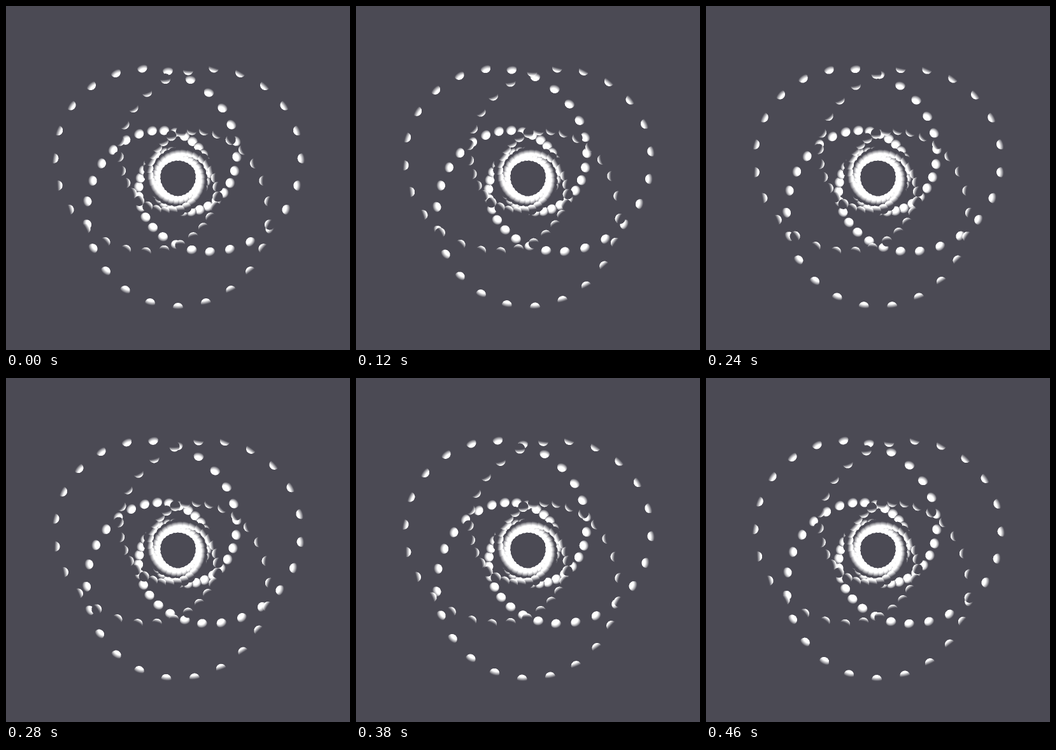
An HTML page with a canvas that plays this animation: 540x540 px, repeating every 480 ms.

```html
<!DOCTYPE html>
<html lang="en">
<head>
<meta charset="utf-8">
<title>Beads on a torus knot</title>
<style>
  html, body { margin: 0; width: 100%; height: 100%; overflow: hidden; background: #4b4a54; }
  canvas { display: block; width: 540px; height: 540px; }
</style>
</head>
<body>
<canvas id="stage" width="540" height="540"></canvas>
<script>
const SIZE = 540, SS = 2, W = SIZE * SS;
const LOOP = 480, STEP = 20;
const BEADS = 200, TURNS = 7, LOBES = 3;
const SCALE = 84.5, BEAD = 8, LAMP = 50, GAIN = 1.4;
const BACK = [75, 74, 84];

const ctx = document.getElementById('stage').getContext('2d');
const buffer = document.createElement('canvas');
buffer.width = buffer.height = W;
const bufferCtx = buffer.getContext('2d');
const image = bufferCtx.createImageData(W, W);
const pixels = new Uint32Array(image.data.buffer);
const depth = new Float32Array(W * W);

// Background colour to white, packed as ABGR
const shades = Uint32Array.from({ length: 256 }, (_, i) => {
  const [r, g, b] = BACK.map(c => Math.round(c + (255 - c) * i / 255));
  return (255 << 24 | b << 16 | g << 8 | r) >>> 0;
});

// Torus knot on a stereographically projected Clifford torus
function knot(turn) {
  const angle = turn * TURNS * 2 * Math.PI;
  const u = turn * LOBES * 2 * Math.PI;
  const k = SCALE / (Math.SQRT2 - Math.cos(u));
  return [-k * Math.sin(angle), k * Math.cos(angle), -k * Math.sin(u)];
}

// Sphere lit by a lamp on the axis, a little in front of the centre
function drawBead([x, y, z]) {
  const cx = W / 2 + x * SS, cy = W / 2 + y * SS, rad = BEAD * SS;
  const dist = Math.hypot(x, y, LAMP - z);
  const lx = -x / dist, ly = -y / dist, lz = (LAMP - z) / dist;
  for (let py = Math.floor(cy - rad); py <= cy + rad; py++) {
    const ny = (py + 0.5 - cy) / rad;
    for (let px = Math.floor(cx - rad); px <= cx + rad; px++) {
      const nx = (px + 0.5 - cx) / rad;
      const rest = 1 - nx * nx - ny * ny;
      if (rest < 0) continue;
      const nz = Math.sqrt(rest), d = z + BEAD * nz, i = py * W + px;
      if (d <= depth[i]) continue;
      depth[i] = d;
      const light = GAIN * (nx * lx + ny * ly + nz * lz);
      pixels[i] = shades[Math.round(255 * Math.min(1, Math.max(0, light)))];
    }
  }
}

function draw(shift) {
  pixels.fill(shades[0]);
  depth.fill(-1e4);
  for (let i = 0; i < BEADS; i++) drawBead(knot((i - shift) / BEADS));
  bufferCtx.putImageData(image, 0, 0);
  ctx.drawImage(buffer, 0, 0, SIZE, SIZE);
}

const start = performance.now();
let shown = -1;
function tick() {
  const time = (performance.now() - start) % LOOP;
  const step = Math.floor(time / STEP);
  if (step !== shown) {
    shown = step;
    draw(step * STEP / LOOP);
  }
  requestAnimationFrame(tick);
}
tick();
</script>
</body>
</html>
```
